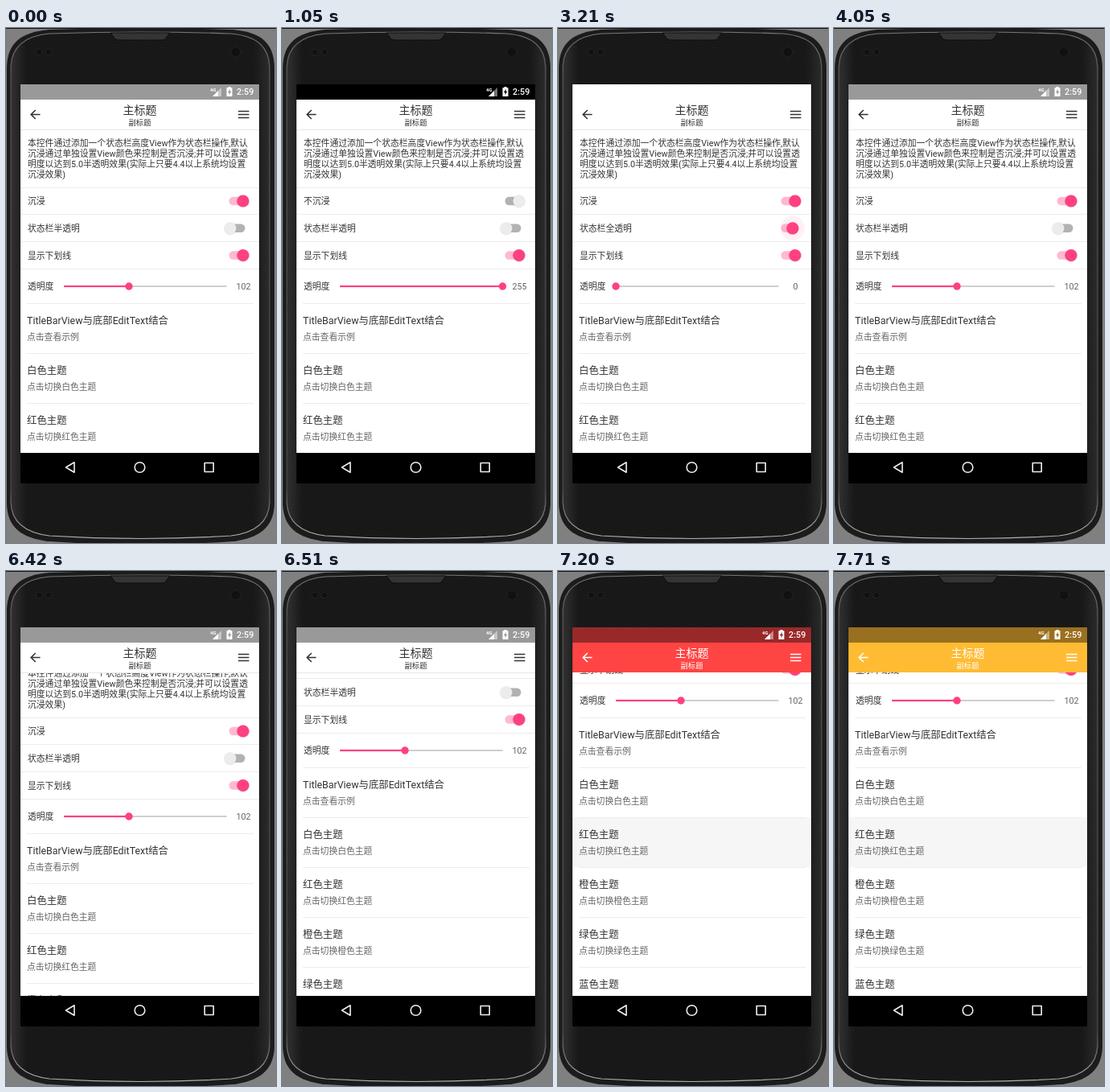
These frames come from a looping animation (336x640 px, 8 s). An HTML page:

```html
<!DOCTYPE html>
<html lang="zh">
<head>
<meta charset="utf-8">
<style>
html, body { margin: 0; width: 100%; height: 100%; overflow: hidden; background: #808080; }
svg { display: block; width: 336px; height: 640px; font-family: Roboto, "Noto Sans CJK SC", "Noto Sans CJK", sans-serif; }
.body { font-size: 10.8px; fill: #333; }
.head { font-size: 12.4px; fill: #333; }
.sub { font-size: 10.8px; fill: #666; }
.mid { text-anchor: middle; }
</style>
</head>
<body>
<svg viewBox="0 0 336 640">
  <defs>
    <linearGradient id="edge" x2="0" y2="1">
      <stop offset="0" stop-color="#777"/><stop offset=".1" stop-color="#555"/>
      <stop offset=".9" stop-color="#4a4a4a"/><stop offset="1" stop-color="#b0b0b0"/>
    </linearGradient>
    <linearGradient id="face" x2="1" y2="0">
      <stop offset="0" stop-color="#303030"/><stop offset=".06" stop-color="#171717"/>
      <stop offset=".94" stop-color="#171717"/><stop offset="1" stop-color="#2a2a2a"/>
    </linearGradient>
    <pattern id="weave" width="4" height="4" patternUnits="userSpaceOnUse">
      <path d="M0 0h1v1h-1zM2 2h1v1h-1z" fill="#fff" opacity=".045"/>
    </pattern>
    <clipPath id="view"><rect x="18" y="126" width="297" height="402"/></clipPath>
    <path id="shell" d="M6 48C7 24 22 10 54 7Q168 3 280 7C313 10 327 24 328 48V590C327 613 312 627 280 631Q168 638 54 631C22 627 7 613 6 590Z"/>
  </defs>

  <rect width="336" height="640" fill="#808080"/>
  <rect width="336" height="1" fill="#111"/>
  <path d="M1 48C2 19 18 5 54 2Q168 -2 282 2C318 5 333 19 334 48V592C333 620 316 634 282 638Q168 646 54 638C18 634 2 620 1 592Z" fill="#1c1c1c"/>
  <use href="#shell" fill="url(#face)" stroke="url(#edge)" stroke-width="1.2"/>
  <use href="#shell" fill="url(#weave)"/>
  <path d="M130 6H204L198 14Q196 15 193 15H141Q138 15 136 14Z" fill="#343434" stroke="#0c0c0c"/>
  <g fill="#111" stroke="#222"><circle cx="41" cy="30" r="4"/><circle cx="53" cy="30" r="4"/><circle cx="286" cy="30" r="6"/></g>

  <rect x="18" y="70" width="297" height="496" fill="#000"/>
  <rect x="18" y="126" width="297" height="402" fill="#fff"/>
  <g clip-path="url(#view)"><g id="list"></g></g>

  <rect id="status" x="18" y="70" width="297" height="19"/>
  <g fill="#fff">
    <text x="254" y="79" font-size="6" font-weight="700">4G</text>
    <path d="M257 85L268 74V85Z" opacity=".45"/>
    <path d="M257 85L264 78V85Z"/>
    <path d="M276.5 73h3v1.2h2v10.8h-7V74.2h2z"/>
    <text x="287" y="83.3" font-size="10.8" font-weight="500">2:59</text>
  </g>
  <path id="bolt" d="M278.7 75.8L275.9 80.2H277.7V83.2L280.3 78.8H278.7Z"/>

  <rect id="bar" x="18" y="89" width="297" height="37"/>
  <rect id="line" x="18" y="126" width="297" height="1" fill="#e8e8e8"/>
  <g id="ink">
    <text class="mid" x="166.5" y="107" font-size="14">主标题</text>
    <text class="mid" x="166.5" y="120.5" font-size="9.3" font-weight="500">副标题</text>
    <g fill="none" stroke="currentColor" stroke-width="1.6">
      <path d="M42.5 107.5H31.5M36.7 102L31.2 107.5L36.7 113"/>
      <path d="M289 103.5H302.5M289 107.5H302.5M289 111.5H302.5"/>
    </g>
  </g>

  <g fill="none" stroke="#eee" stroke-width="1.6" stroke-linejoin="round">
    <path d="M74.5 546L85 539.8V552.2Z"/>
    <circle cx="166.5" cy="546" r="6.3"/>
    <rect x="247.2" y="540.5" width="11" height="11"/>
  </g>
</svg>
<script>
const LOOP = 8000, STEP = 30, SWITCH = 210, PINK = '#ff4081';
const $ = id => document.getElementById(id);
const list = $('list');

const set = (el, attrs) => { for (const k in attrs) el.setAttribute(k, attrs[k]); };

function add(tag, attrs, text) {
  const el = document.createElementNS('http://www.w3.org/2000/svg', tag);
  set(el, attrs);
  if (text) el.textContent = text;
  return list.appendChild(el);
}

const label = (cls, x, mid, text) => add('text', { class: cls, x, y: mid + 4 }, text);
const rule = (x, y, width) => add('rect', { x, y, width, height: 1, fill: '#ececec' });

// Returns a setter: target state, progress towards it, optional caption.
function toggle(y, text) {
  const name = label('body', 27, y, text);
  const track = add('rect', { x: 277.5, y: y - 5.2, width: 20, height: 10.4, rx: 5.2 });
  const ripple = add('circle', { cy: y, r: 15 });
  const shade = add('circle', { cy: y + .5, r: 7.9, fill: '#000', opacity: .1 });
  const thumb = add('circle', { cy: y, r: 7.6 });
  return (on, p, word) => {
    const e = .5 - Math.cos(Math.PI * p) / 2;
    const cx = 279 + 16 * (on ? e : 1 - e);
    set(track, { fill: on ? '#ffb9d1' : '#b2b2b2' });
    set(thumb, { cx, fill: on ? PINK : '#ececec' });
    set(shade, { cx });
    set(ripple, { cx, fill: on ? PINK : '#000', opacity: .1 * Math.sin(Math.PI * p) });
    if (word) name.textContent = word;
  };
}

const press = add('rect', { x: 18, y: 466, width: 297, height: 62, fill: '#f6f6f6' });

['本控件通过添加一个状态栏高度View作为状态栏操作,默认',
 '沉浸通过单独设置View颜色来控制是否沉浸;并可以设置透',
 '明度以达到5.0半透明效果(实际上只要4.4以上系统均设置',
 '沉浸效果)'].forEach((s, i) => label('body', 27, 143 + i * 13, s));
[198, 231, 265, 299].forEach(y => rule(18, y, 297));

const immerse = toggle(215, '沉浸');
const clear = toggle(248.8, '状态栏半透明');
toggle(282.5, '显示下划线')(true, 1);

label('body', 27, 321, '透明度');
add('rect', { x: 72, y: 320.2, width: 202.5, height: 1.6, fill: '#c4c4c4' });
const fill = add('rect', { x: 72, y: 319.9, height: 2.2, fill: PINK });
const knob = add('circle', { cy: 321, r: 4.7, fill: PINK });
const value = add('text', { class: 'sub mid', x: 295.6, y: 325 });

const rows = [['TitleBarView与底部EditText结合', '点击查看示例']];
for (const c of '白红橙绿蓝') rows.push([c + '色主题', `点击切换${c}色主题`]);
rows.forEach(([head, sub], i) => {
  const y = 342 + i * 62;
  rule(26, y, 282);
  label('head', 26, y + 22, head);
  label('sub', 26, y + 42, sub);
});

const part = (t, start) => Math.min(1, Math.max(0, (t - start) / SWITCH));

function draw(t) {
  const immersed = t < 1050 || t >= 2040;
  const isClear = t >= 3060 && t < 3840;
  const alpha = isClear ? 0 : t >= 1050 && t < 3060 ? 255 : 102;

  immerse(immersed, t < 1050 ? 1 : part(t, immersed ? 2040 : 1050), immersed ? '沉浸' : '不沉浸');
  clear(isClear, t < 3060 ? 1 : part(t, isClear ? 3060 : 3840), isClear ? '状态栏全透明' : '状态栏半透明');

  const w = 202.5 * alpha / 255;
  set(fill, { width: w });
  set(knob, { cx: 72 + w });
  value.textContent = alpha;

  const scroll = t < 6420 ? 0 : 16 + 144 * (1 - (1 - part(t, 6420)) ** 1.5);
  set(list, { transform: `translate(0 ${-Math.round(scroll)})` });

  const themed = t >= 7200;
  const [bar, dark] = t >= 7710 ? ['#ffbb33', '#99701f'] : themed ? ['#ff4444', '#992929'] : ['#fff', '#999'];
  const status = !immersed ? '#000' : isClear ? '#fff' : dark;
  const ink = themed ? '#fff' : '#333';
  set(press, { opacity: +themed });
  set($('bar'), { fill: bar });
  set($('status'), { fill: status });
  set($('bolt'), { fill: status });
  set($('line'), { opacity: +!themed });
  set($('ink'), { fill: ink, color: ink });
}

const begin = performance.now();
function tick() {
  const t = (performance.now() - begin) % LOOP;
  draw(Math.floor(t / STEP) * STEP);
  requestAnimationFrame(tick);
}
tick();
</script>
</body>
</html>
```
